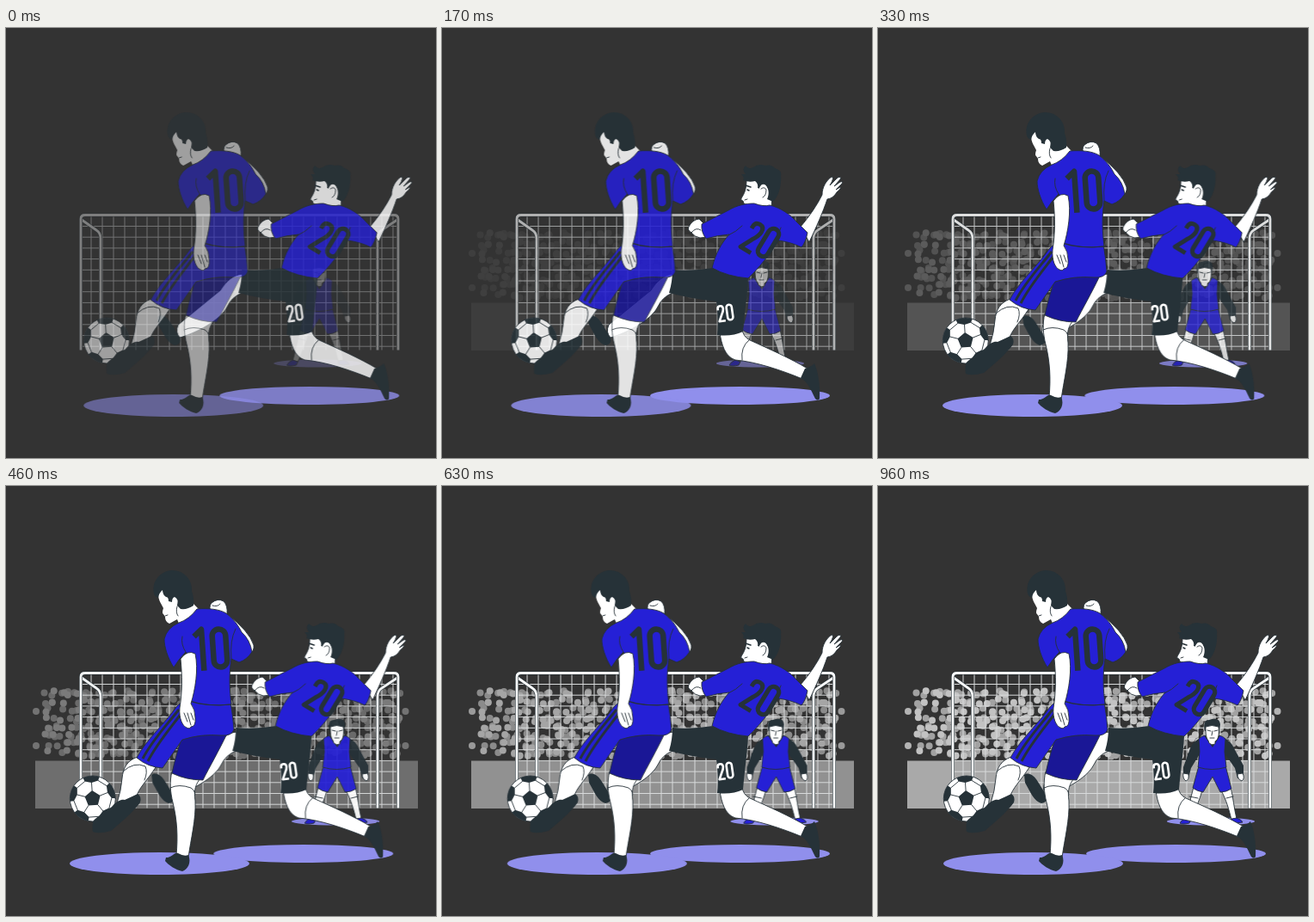
Recreate the animation shown at these times as an HTML page. Size 500 by 500 pixels, loop 1040 ms.

```html
<!DOCTYPE html>
<html lang="en">
<head>
<meta charset="utf-8">
<title>Football match</title>
<style>
html, body { margin: 0; width: 100%; height: 100%; overflow: hidden; background: #333; }
svg { display: block; width: 100vw; height: 100vh; }

.ink { fill: #263238; }
.blue { fill: #2520d6; }
.navy { fill: #1a1796; }
.skin { fill: #fff; }
.shade { fill: #908fec; }
.edge { stroke: #263238; stroke-width: .9; stroke-linejoin: round; }
.line { fill: none; stroke: #263238; stroke-width: .9; stroke-linecap: round; }
.digit { fill: none; stroke: #263238; stroke-width: 5; stroke-linejoin: round; }

/* The loop is 25 ticks of 41.6 ms, 4% each; steps() holds every tick. */
#crowd, #goal, #keeper, #defender, #striker { animation: 1040ms -4ms infinite; }
#crowd { animation-name: crowd; }
#goal { animation-name: goal; }
#keeper { animation-name: keeper; }
#defender { animation-name: defender; }
#striker { animation-name: striker; }

@keyframes crowd {
  0% { opacity: 0; animation-timing-function: steps(2); }
  8% { opacity: .03; animation-timing-function: steps(2); }
  16% { opacity: .09; animation-timing-function: steps(4); }
  32% { opacity: .28; animation-timing-function: steps(3); }
  44% { opacity: .5; animation-timing-function: steps(4); }
  60% { opacity: .8; animation-timing-function: steps(8); }
  92%, 100% { opacity: 1; }
}
@keyframes goal {
  0% { opacity: .38; animation-timing-function: steps(2); }
  8% { opacity: .5; animation-timing-function: steps(2); }
  16% { opacity: .63; animation-timing-function: steps(4); }
  32% { opacity: .86; animation-timing-function: steps(3); }
  44% { opacity: .96; animation-timing-function: steps(4); }
  60%, 100% { opacity: 1; }
}
@keyframes keeper {
  0% { opacity: .25; transform: translateX(-24.5px); animation-timing-function: steps(2); }
  8% { opacity: .4; transform: translateX(-21px); animation-timing-function: steps(2); }
  16% { opacity: .54; transform: translateX(-17px); animation-timing-function: steps(4); }
  32% { opacity: .79; transform: translateX(-8.8px); animation-timing-function: steps(3); }
  44% { opacity: .93; transform: translateX(-3.8px); animation-timing-function: steps(4); }
  60% { opacity: 1; transform: translateX(-.4px); animation-timing-function: steps(4); }
  76%, 100% { opacity: 1; transform: none; }
}
@keyframes defender {
  0% { opacity: .8; transform: translateX(6.3px); animation-timing-function: steps(2); }
  8% { opacity: .93; transform: translateX(2.7px); animation-timing-function: steps(2); }
  16% { opacity: 1; transform: translateX(0); animation-timing-function: steps(4); }
  32% { opacity: 1; transform: translateX(-1.7px); animation-timing-function: steps(3); }
  44% { opacity: 1; transform: translateX(-.7px); animation-timing-function: steps(4); }
  60%, 100% { opacity: 1; transform: none; }
}
@keyframes striker {
  0% { opacity: .53; transform: translateX(14.2px); animation-timing-function: steps(2); }
  8% { opacity: .72; transform: translateX(9px); animation-timing-function: steps(2); }
  16% { opacity: .87; transform: translateX(4.4px); animation-timing-function: steps(2); }
  24% { opacity: .95; transform: translateX(1px); animation-timing-function: steps(2); }
  32% { opacity: 1; transform: translateX(-1px); animation-timing-function: steps(2); }
  40% { opacity: 1; transform: translateX(-2px); animation-timing-function: steps(1); }
  44% { opacity: 1; transform: translateX(-2px); animation-timing-function: steps(4); }
  60% { opacity: 1; transform: translateX(-.2px); animation-timing-function: steps(4); }
  76%, 100% { opacity: 1; transform: none; }
}
</style>
</head>
<body>
<svg viewBox="0 0 500 500">
  <defs>
    <path id="one" d="M-5 -11 L2 -17 V20"/>
    <path id="two" d="M-6 -8 V-11 Q-6 -17 0 -17 Q6 -17 6 -10 Q6 -5 1 3 L-6 17 H8"/>
    <rect id="zero" x="-6" y="-17" width="12" height="34" rx="6"/>
    <clipPath id="round"><circle r="26.5"/></clipPath>
  </defs>

  <g id="crowd">
    <g id="heads"></g>
    <rect x="34" y="319.500" width="445" height="55.500" fill="#a9a9a9"/>
  </g>

  <g id="goal" fill="none">
    <path id="net" stroke="#d8dadb" stroke-width="1"/>
    <g id="posts">
      <path d="M88 223 L105 235 Q110 238 110 245 V374.500"/>
      <path d="M455 223 L437 235 Q432 238 432 245 V374.500"/>
      <path d="M87 374.500 V222 Q87 217.500 92 217.500 H451 Q456 217.500 456 222 V374.500"/>
    </g>
  </g>

  <g id="keeper">
    <ellipse class="shade" cx="387" cy="390" rx="51" ry="4.500"/>
    <path class="skin edge" d="M367 350 C363 364 361 376 358 387 L364 388 C369 376 374 365 377 354Z M399 354 C405 365 408 376 411 388 L417 387 C414 375 413 362 410 350Z"/>
    <path class="blue edge" d="M358 386 L364 388 L362 392 Q354 394 351 392 Q353 388 358 386Z M411 387 L417 386 Q423 388 424 391 Q416 393 411 391Z"/>
    <path class="ink" d="M375 293 Q366 297 363 305 L355 327 L355 339 L361 340 L364 328 L375 310Z M402 293 Q411 297 414 305 L425 325 L425 339 L418 340 L415 328 L403 311Z"/>
    <path class="skin edge" d="M355 334 L361 335 Q362 342 358 343 Q354 340 355 334Z M418 335 L424 334 Q427 340 423 343 Q418 341 418 335Z"/>
    <path class="blue edge" d="M373 325 H404 L411 352 Q405 356 398 356 L389 338 L378 356 Q371 355 366 351Z"/>
    <path class="blue edge" d="M380 290 Q376 291 373 294 L374 309 L372 327 Q388 332 405 327 L403 309 L404 294 Q401 291 397 290 Q389 300 380 290Z"/>
    <path class="ink" d="M379 290 L389 304 L398 290 L394 291 L389 299 L383 291Z"/>
    <path class="ink" d="M380 285 Q377 272 385 272 Q397 268 398 277 L397 286Z"/>
    <path class="skin edge" d="M381 280 Q388 277 396 280 C397 288 396 295 392 297 L392 300 Q388 302 385 299 L384 296 C381 292 381 287 381 280Z"/>
    <path class="line" d="M383 284 L387 285 M391 285 L395 284 M389 285 L388 290 M386 293 H391"/>
    <path class="line" d="M362 361 L372 363 M405 363 L413 361"/>
  </g>

  <g id="defender">
    <ellipse class="shade" cx="346.500" cy="427.500" rx="104.500" ry="10.500"/>
    <path class="ink" d="M170 336 C175 332 182 337 186 344 L196 360 Q198 368 190 369 C182 367 177 356 171 345Z"/>
    <path class="skin edge" d="M269 286 C258 287 250 294 243 305 L194 345 Q190 354 196 360 C216 354 243 340 251 324 Q256 313 268 308Z"/>
    <path class="skin edge" d="M323 354 C325 368 329 382 341 386 C365 388 395 398 419 408 L425 396 C405 384 380 373 358 363 Q350 359 349 350Z"/>
    <path class="line" d="M357 363 Q347 371 349 386"/>
    <path class="ink" d="M422 396 Q429 394 433 390 C437 398 440 415 439 431 Q437 434 434 431 C429 421 425 411 417 407Z"/>
    <path class="ink" d="M268 281 Q290 283 315 279 L356 291 C355 310 352 330 350 353 Q337 359 320 357 C322 342 320 327 319 318 Q291 315 264 308 Q268 295 268 281Z"/>
    <g class="digit" style="stroke:#fff">
      <use href="#two" transform="translate(324.500 332) rotate(-8) scale(.52)"/>
      <use href="#zero" transform="translate(334.500 330.500) rotate(-8) scale(.52)"/>
    </g>
    <path class="skin edge" d="M417 231 C428 218 436 206 442 194 C442 185 447 177 453 173 Q457 173 451 183 L460 174 Q465 172 463 176 L456 184 L463 179 Q467 178 465 181 L458 188 L463 185 Q465 186 459 191 Q455 198 448 199 C443 214 435 232 427 249Z"/>
    <path class="skin edge" d="M304 227 L299 222 Q291 223 287 231 Q285 235 290 238 Q294 243 300 244 L308 243Z"/>
    <path class="line" d="M290 238 Q295 231 301 235"/>
    <path class="skin edge" d="M354 176 C354 187 352 192 348 198 Q347 201 350 201 L351 204 Q355 207 362 205 L360 211 Q374 218 383 209 L384 195 L374 177Z"/>
    <path class="blue edge" d="M333 212 C343 206 353 204 363 204 Q374 208 381 206 C394 209 405 217 412 225 L425 238 Q423 249 418 255 C408 250 398 248 391 247 C382 262 368 280 356 291 Q332 289 314 279 C318 262 325 250 334 240 Q320 241 307 245 Q301 237 302 228Z"/>
    <path class="line" d="M333 241 Q342 237 349 230 M391 247 Q390 240 394 232"/>
    <path class="ink" d="M350 177 Q352 174 348 170 L353 170 Q348 164 353 160 Q356 165 362 162 Q368 157 376 160 Q383 158 387 163 Q396 166 394 172 C395 184 391 196 385 202 L378 199 C381 193 380 184 375 182 Q370 181 370 187 L367 186 Q368 181 364 178 Q357 180 350 177Z"/>
    <path class="skin" d="M369 186 Q371 181 376 183 Q380 186 377 194 Q374 199 369 196Z"/>
    <path class="line" d="M371 187 Q375 184 377 188 Q377 195 373 197"/>
    <path class="line" style="stroke-width:1.500" d="M353 183 L359 185 M355 188 L357 189"/>
    <path class="line" d="M352 200 L355 199"/>
    <g class="digit">
      <use href="#two" transform="translate(361 243) rotate(31)"/>
      <use href="#zero" transform="translate(379.500 249.500) rotate(31) scale(1.050)"/>
    </g>
  </g>

  <g id="striker">
    <ellipse class="shade" cx="180.500" cy="439" rx="104.500" ry="13"/>

    <g transform="translate(102.800 363.500)">
      <circle class="skin" r="26.500"/>
      <g clip-path="url(#round)">
        <path id="patches" class="ink"/>
        <path id="seams" class="line"/>
      </g>
      <circle class="line" r="26.500"/>
    </g>

    <path class="skin edge" d="M195 332 C192 344 193 356 196 368 C201 388 202 408 200 429 L214 432 C217 410 223 388 222 366 C220 353 223 346 228 340Z"/>
    <path class="line" d="M193 351 Q203 346 217 351 Q221 353 222 358"/>
    <path class="ink" d="M188 432 C195 432 198 425 202 427 Q209 431 214 429 C218 438 213 446 207 448 C200 447 190 440 187 436Z"/>

    <path class="skin edge" d="M155 315 C143 319 138 328 137 340 Q136 354 131 369 Q143 373 153 363 C156 351 166 343 176 327Z"/>
    <path class="line" d="M138 332 Q151 320 164 326 Q167 333 163 342"/>
    <path class="ink" d="M103 391 C104 386 116 381 125 373 C132 365 137 364 140 365 Q149 361 155 358 Q160 361 158 368 C150 379 135 392 124 401 Q110 405 103 402 Q102 398 103 391Z"/>

    <path class="navy edge" d="M208 288 C203 302 198 319 195 334 Q212 342 231 342 C239 326 250 307 259 288Z"/>
    <path class="blue edge" d="M207 250 L263 251 Q266 268 267 283 Q265 291 252 290 Q229 288 207 295 L184 328 Q167 327 154 316 C165 295 186 277 200 257Z"/>
    <path d="M203 260 C188 279 171 297 161 317 M207 263 C192 283 177 300 167 320" fill="none" stroke="#263238" stroke-width="3"/>

    <path class="skin edge" d="M241 149 Q237 140 241 136 Q248 130 255 134 Q260 139 259 149 Q285 169 290 185 Q291 192 285 195 L262 170Z"/>
    <path class="line" d="M242 139 Q248 141 251 137"/>
    <path class="skin" d="M179 122 C178 131 182 136 185 142 Q183 148 185 149 L187 152 Q187 158 192 160 L201 155 L204 162 L228 145 L218 135 L190 118Z"/>
    <path class="blue edge" d="M203 159 Q215 155 224 143 C237 142 250 143 258 148 C267 155 272 162 276 170 Q286 179 288 193 Q282 202 273 205 L264 201 C261 220 262 238 264 254 Q234 257 215 250 Q219 232 222 212 L211 193 Q203 201 197 211 C190 200 186 187 186 178 Q189 165 203 159Z"/>
    <path class="line" d="M211 193 Q205 184 207 175 M264 201 Q262 180 269 166 M216 250 Q238 257 264 254"/>
    <path class="ink" d="M174 125 C171 110 182 99 195 98 C210 98 219 110 218 122 Q221 131 220 139 Q213 144 205 143 L201 139 Q203 131 198 129 Q195 130 195 135 L191 134 Q191 129 188 129 Q184 126 184 121 Q180 124 179 130 Q175 129 174 125Z"/>
    <path class="line" d="M201 140 Q199 147 202 151 M187 151 L190 150"/>

    <path class="skin edge" d="M205 201 C207 220 207 240 204 258 C203 270 207 279 212 281 Q216 283 217 280 Q223 280 222 269 Q222 260 217 253 C222 237 226 213 222 195 Q213 190 205 201Z"/>
    <path class="line" d="M209 264 L213 274 M213 264 L217 278 M217 264 L220 272"/>
    <g class="digit">
      <use href="#one" transform="translate(228 189) rotate(-4) scale(1.300)"/>
      <use href="#zero" transform="translate(250.500 188.500) rotate(-4) scale(1.300)"/>
    </g>
  </g>
</svg>
<script>
const NS = 'http://www.w3.org/2000/svg';
const $ = id => document.getElementById(id);

// Net mesh
let mesh = '';
for (let x = 99; x < 455; x += 13) mesh += `M${x} 219V374.5`;
for (let y = 230.5; y < 374; y += 12.7) mesh += `M88 ${y}H455`;
$('net').setAttribute('d', mesh);

// Each post is a white bar on a slightly wider dark one
for (const post of [...$('posts').children]) {
  const rim = post.cloneNode();
  rim.setAttribute('stroke', '#263238');
  rim.setAttribute('stroke-width', 4);
  post.setAttribute('stroke', '#fafbfb');
  post.setAttribute('stroke-width', 2.8);
  post.before(rim);
}

// Ball: a middle pentagon, five patches on the rim, seams between them
const polar = (r, deg) => {
  const a = deg * Math.PI / 180;
  return `${(r * Math.cos(a)).toFixed(1)} ${(r * Math.sin(a)).toFixed(1)}`;
};
let middle = [], rim = '', seams = '';
for (let k = 0; k < 5; k++) {
  const a = -94 + 72 * k;
  middle.push(polar(9.5, a));
  rim += `M${polar(18.5, a)}L${polar(22, a + 21)}L${polar(29, a + 21)}L${polar(29, a - 21)}L${polar(22, a - 21)}Z`;
  seams += `M${polar(9.5, a)}L${polar(18.5, a)}M${polar(22, a + 21)}L${polar(22, a + 51)}`;
}
$('patches').setAttribute('d', `M${middle.join('L')}Z${rim}`);
$('seams').setAttribute('d', seams);

// Spectators
let seed = 11;
const rand = () => (seed = seed * 16807 % 2147483647) / 2147483647;

function head(x, y, fill) {
  const dot = document.createElementNS(NS, 'circle');
  dot.setAttribute('cx', x.toFixed(1));
  dot.setAttribute('cy', y.toFixed(1));
  dot.setAttribute('r', 4);
  dot.setAttribute('fill', fill);
  $('heads').append(dot);
}

for (const [fill, keep] of [['#a2a2a2', .72], ['#c2c2c2', .6]]) {
  for (let y = 241; y < 320; y += 10) {
    for (let x = 48; x < 460; x += 8.5) {
      const dx = rand() * 7 - 3.5, dy = rand() * 7 - 3.5;
      if (rand() < keep) head(x + dx, y + dy, fill);
    }
  }
}
for (const y of [262, 302]) {
  head(35, y, '#b4b4b4');
  head(464.5, y, '#b4b4b4');
}
</script>
</body>
</html>
```
